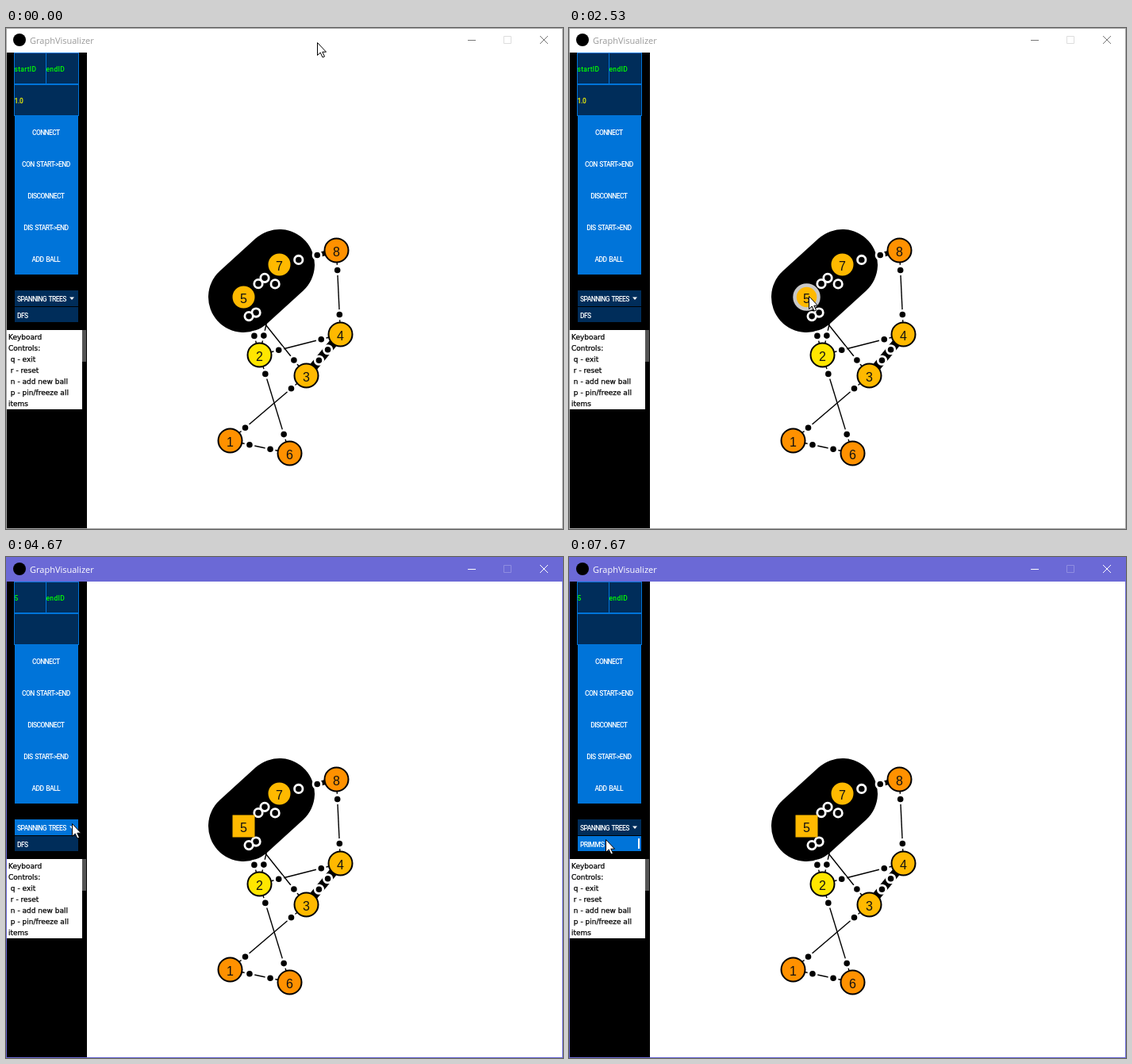
Recreate the animation shown at these times as an HTML page. Size 702 px wide and 632 px high, loop 8000 ms.

```html
<!DOCTYPE html>
<html lang="en">
<head>
<meta charset="utf-8">
<title>GraphVisualizer</title>
<style>
html, body { margin: 0; width: 100%; height: 100%; overflow: hidden; background: #fff; }
svg { display: block; }
text { white-space: pre; }
.title { font: 11px "Open Sans", sans-serif; }
.ui { font: 500 8.5px Roboto, sans-serif; letter-spacing: -.6px; word-spacing: 1.2px; fill: #fff; }
.field { font: 500 8.5px Roboto, sans-serif; letter-spacing: .3px; fill: #0f0; }
.help { font: 9px "DejaVu Sans", sans-serif; fill: #000; stroke: #000; stroke-width: .25px; }
.num { font: 16px "Liberation Sans", Arial, sans-serif; text-anchor: middle; fill: #111; }
</style>
</head>
<body>
<svg id="stage" width="702" height="632" viewBox="0 0 702 632"></svg>
<script>
const LOOP = 8000, STEP = 200 / 3;
const NAVY = '#002d5a', BLUE = '#0074d9', PRESSED = '#00aaff';
const stage = document.getElementById('stage');

function add(tag, attrs, label) {
  const el = document.createElementNS('http://www.w3.org/2000/svg', tag);
  set(el, attrs);
  if (label !== undefined) el.textContent = label;
  return stage.appendChild(el);
}
function set(el, attrs) {
  for (const k in attrs) el.setAttribute(k, attrs[k]);
}
const rect = (x, y, width, height, fill, more) => add('rect', { x, y, width, height, fill, ...more });
const text = (cls, x, y, label, more) => add('text', { class: cls, x, y, ...more }, label);
const show = (el, on) => el.setAttribute('visibility', on ? 'visible' : 'hidden');

// Window
rect(0, 0, 702, 632, '#fff');
const bar = rect(0, 0, 702, 31, '#fff');
add('circle', { cx: 17, cy: 15, r: 8, fill: '#000' });
const title = text('title', 30, 20, 'GraphVisualizer');
const minMark = add('path', { d: 'M582 15.5h10', fill: 'none' });
const maxMark = add('path', { d: 'M627.5 10.5h9v9h-9z', fill: 'none' });
const closeMark = add('path', { d: 'M673 10l10 10M683 10l-10 10', fill: 'none' });

// Side panel
rect(1, 31, 101, 600, '#000');
const outline = { stroke: BLUE };
rect(10.5, 31.5, 40, 39, NAVY, outline);
rect(50.5, 31.5, 41, 39, NAVY, outline);
rect(10.5, 71.5, 81, 39, NAVY, outline);
const startField = text('field', 10.5, 55, 'startID');
text('field', 50.5, 55, 'endID');
const weight = text('field', 10.5, 95, '1.0', { style: 'fill:#ff0;letter-spacing:-.4px' });
rect(11, 111, 80, 200, BLUE);
['CONNECT', 'CON START->END', 'DISCONNECT', 'DIS START->END', 'ADD BALL'].forEach((label, i) =>
  text('ui', 50.3, 135 + 40 * i, label, { 'text-anchor': 'middle' }));

const header = rect(11, 331, 80, 20, NAVY);
text('ui', 14, 345, 'SPANNING TREES');
const caret = add('path', { fill: '#fff' });
const item = rect(11, 352, 80, 19, NAVY);
const itemText = text('ui', 14, 366, 'DFS');
const thumb = rect(87, 353, 2, 13, '#fff');

rect(1, 381, 95, 100, '#fff');
rect(96, 381, 5, 40, '#555');
['Keyboard', 'Controls:', ' q - exit', ' r - reset', ' n - add new ball', ' p - pin/freeze all', 'items']
  .forEach((label, i) => text('help', 3, 393 + 14 * i, label));

// Graph: each edge names its two nodes, a node's colour follows its degree
const nodes = {
  1: [282.5, 520.5], 2: [319.5, 412.5], 3: [378.5, 438.5], 4: [421.5, 386.5],
  5: [299.5, 339.5], 6: [357.5, 536.5], 7: [344.5, 298.5], 8: [416.5, 280.5]
};
const edges = '57 78 34 84 24 35 25 27 13 26 16'.split(' ');
const heavy = { 57: 89, 34: 11, 78: 6 };
const shade = { 2: '#ff9100', 3: '#ffb900', 4: '#ffe600' };
const degree = id => edges.filter(e => e.includes(id)).length;

for (const e of edges) {
  const [x1, y1] = nodes[e[0]], [x2, y2] = nodes[e[1]];
  add('line', { x1, y1, x2, y2, stroke: '#000', 'stroke-width': heavy[e] || 1.4, 'stroke-linecap': e === '57' ? 'round' : 'butt' });
}
function dot(a, b) {
  const [x, y] = nodes[a], [u, v] = nodes[b];
  const k = 25 / Math.hypot(u - x, v - y);
  add('circle', { cx: x + (u - x) * k, cy: y + (v - y) * k, r: 5.2, fill: '#000', stroke: '#fff', 'stroke-width': 2.8 });
}
for (const [a, b] of edges) { dot(a, b); dot(b, a); }

let ball, square;
for (const id in nodes) {
  const [cx, cy] = nodes[id], fill = shade[degree(id)];
  const disc = add('circle', { cx, cy, r: 15, fill, stroke: '#000', 'stroke-width': 2 });
  if (id === '5') {
    ball = disc;
    square = rect(cx - 14, cy - 14, 28, 28, fill);
  }
  text('num', cx, cy + 7, id);
}

const frame = rect(.5, .5, 701, 631, 'none');
const cursor = add('path', {
  d: 'M.5 .5V16.5L4.2 13L7 19L9.5 18L6.8 12.2H11.5Z',
  fill: '#fff', stroke: '#000'
});

// Pointer moves: start and end ms, where to, sideways bend
const moves = [
  [67, 933, 213, 343, 0],
  [933, 1600, 84, 345, 14],
  [1733, 2533, 302, 338, -22],
  [2867, 3733, 83, 336, -14],
  [4800, 5267, 60, 358, 0],
  [5267, 5533, 42, 360, 0],
  [5933, 6133, 44, 355, 0],
  [6800, 6933, 46, 359, 0],
  [7533, 7667, 46, 356, 0]
];
function pointer(t) {
  let x = 392, y = 18;
  for (const [from, to, toX, toY, bend] of moves) {
    if (t < from) break;
    const u = Math.min(1, (t - from) / (to - from));
    const k = 1 - (1 - u) ** 3.4;
    x += (toX - x) * k;
    y += (toY - y) * k + bend * Math.sin(Math.PI * k);
  }
  return [Math.round(x), Math.round(y)];
}

function render(ms) {
  const t = Math.floor((ms + 4) / STEP) * STEP + .5;
  const [x, y] = pointer(t);
  const active = t >= 2730, open = t < 4000 || t >= 4666;
  const inList = x >= 11 && x < 91;
  const onHeader = inList && y >= 331 && y < 351;
  const onItem = open && inList && y >= 351 && y < 371;
  const onBall = Math.hypot(x - nodes[5][0], y - nodes[5][1]) < 15;

  set(bar, { fill: active ? '#6b69d6' : '#fff' });
  set(frame, { stroke: active ? '#6b69d6' : '#a5a5a5' });
  set(title, { fill: active ? '#fff' : '#999' });
  set(minMark, { stroke: active ? '#fff' : '#777' });
  set(maxMark, { stroke: active ? '#8f8de0' : '#ddd' });
  set(closeMark, { stroke: active ? '#fff' : '#777' });
  startField.textContent = active ? '5' : 'startID';
  show(weight, !active);

  set(header, { fill: onHeader ? BLUE : NAVY });
  set(caret, { d: open ? 'M80 339.5h6l-3 3.5z' : 'M80 343h6l-3 -3.5z' });
  const pressed = t >= 7400 && t < 7600;
  set(item, { fill: onItem ? (pressed ? PRESSED : BLUE) : NAVY });
  const row = t < 6866 ? 0 : t < 7600 ? 1 : 2;
  itemText.textContent = ['DFS', 'BFS', "PRIMM'S"][row];
  set(thumb, { y: 353 + row });
  show(item, open);
  show(itemText, open);
  show(thumb, onItem);

  const ring = onBall
    ? { stroke: '#c8c8c8', 'stroke-width': 4.5 }
    : { stroke: '#000', 'stroke-width': 2 };
  set(ball, ring);
  set(square, onBall ? ring : { stroke: 'none' });
  show(ball, !active);
  show(square, active);
  set(cursor, { transform: `translate(${x} ${y})` });
}

function tick() {
  render(performance.now() % LOOP);
  requestAnimationFrame(tick);
}
tick();
</script>
</body>
</html>
```
